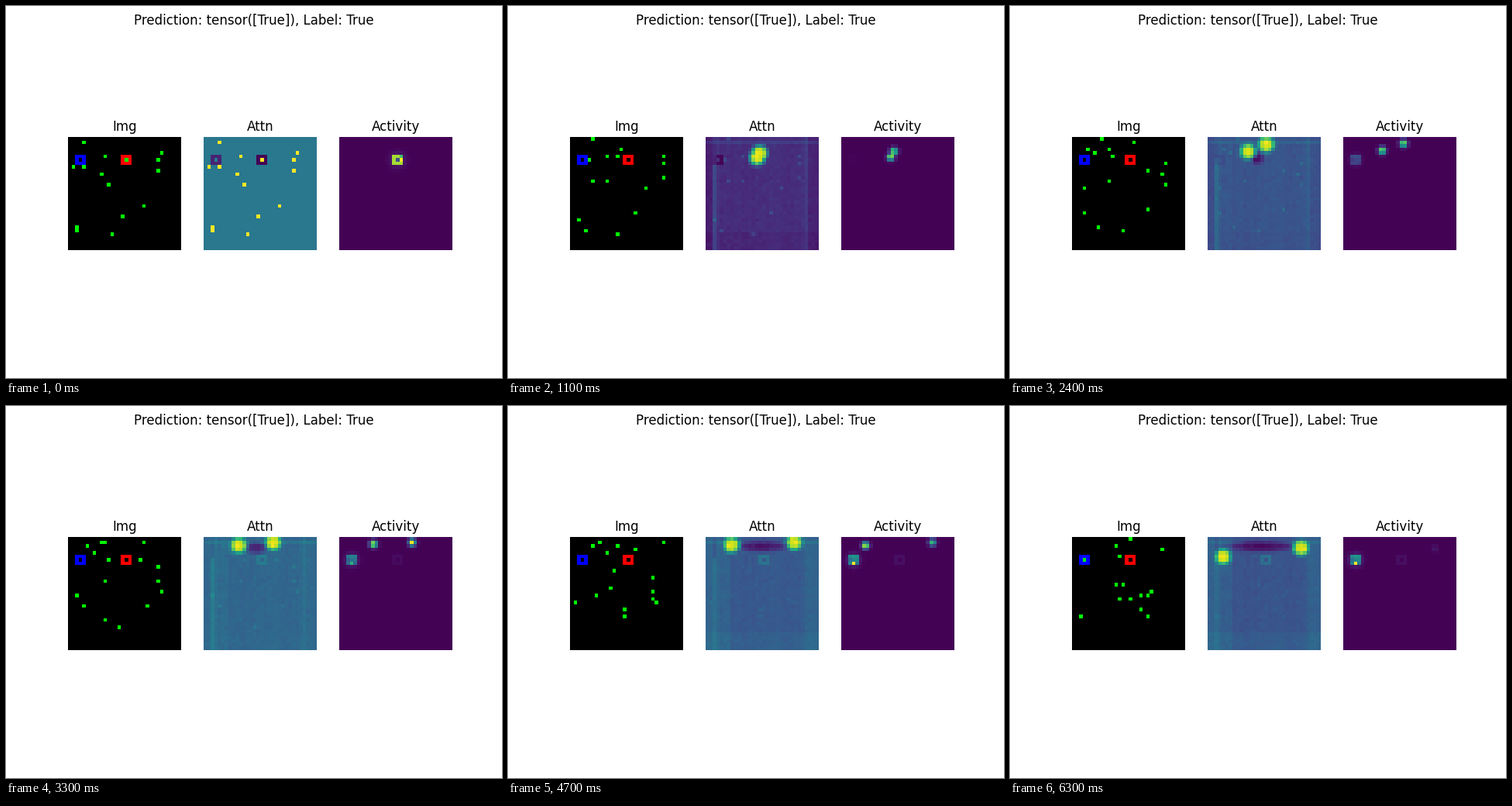
A matplotlib script for the animation above (6.4 s loop, 640x480 px).

```python
import numpy as np
import matplotlib.pyplot as plt
from matplotlib.animation import FuncAnimation

N, FRAMES, INTERVAL = 32, 64, 100
RED, BLUE = (16, 6), (3, 6)  # (column, row) of the ring centres

# Key points of the two tracked dots
TIMES = [0, 11, 24, 33, 47, 54, 63]
TARGET = [(16, 6), (13, 5), (10, 3), (9, 1), (6, 2), (5, 4), (3, 6)]
DECOY = [(16, 6), (14, 3), (17, 1), (21, 1), (26, 1), (27, 2), (25, 3)]

# Start and end cell of every distractor; between them it bows outwards
PATHS = np.array([
    (4, 1, 17, 6), (10, 5, 14, 13), (26, 4, 19, 16), (25, 6, 19, 20),
    (25, 9, 21, 22), (1, 8, 12, 2), (4, 8, 13, 5), (9, 10, 2, 22),
    (11, 13, 13, 17), (21, 19, 16, 0), (15, 22, 22, 15), (2, 25, 12, 13),
    (2, 26, 21, 16), (12, 27, 16, 17),
])
STARTS, ENDS = PATHS[:, :2], PATHS[:, 2:]
OUTWARD = (STARTS + ENDS) / 2 - (14, 18)
OUTWARD /= np.hypot(*OUTWARD.T)[:, None]
BOW = 3.2

yy, xx = np.mgrid[:N, :N]
rng = np.random.default_rng(4)
grain = rng.normal(0, 0.008, (N, N)) + rng.normal(0, 0.005, N)


def ease(t, start, end):
    s = np.clip((t - start) / (end - start), 0, 1)
    return s * s * (3 - 2 * s)


def tracked(t):
    return np.array([[np.interp(t, TIMES, axis) for axis in zip(*path)]
                     for path in (TARGET, DECOY)])


def dot_cells(t):
    s = t / (FRAMES - 1)
    others = STARTS + (ENDS - STARTS) * s + BOW * 4 * s * (1 - s) * OUTWARD
    spots = np.rint(np.vstack([tracked(t), others])).astype(int)
    return tuple(np.clip(spots, 0, N - 1).T[::-1])  # rows, columns


def dist2(x, y):
    return (xx - x) ** 2 + (yy - y) ** 2


def ring(center):
    x, y = center
    return np.maximum(abs(xx - x), abs(yy - y)) == 1


def stimulus(t):
    img = np.zeros((N, N, 3))
    img[dot_cells(t)] = (0, 1, 0)
    img[ring(RED)] = (1, 0, 0)
    img[ring(BLUE)] = (0, 0, 1)
    return img


def attention(t):
    if t == 0:
        a = np.full((N, N), 0.4)
        a[dot_cells(t)] = 1
        a[ring(RED)] = 0
        a[ring(BLUE)] = 0.1
        return a

    late = ease(t, 11, 54)
    a = 0.13 + 0.2 * ease(t, 10, 33) - 0.07 * ease(t, 33, 54) + grain

    # border bands
    a[:, :2] += 0.1 * late - 0.04
    a[6:, 2] += 0.09
    a[:, 3:7] += 0.04 * late
    a[:, 28] += 0.04
    a[:, 29:] += 0.08 * late - 0.03
    a[27:] += 0.05 * late - 0.02
    a[1] += 0.05

    a[dot_cells(t)] += 0.09 - 0.06 * late
    a[ring(BLUE)] -= 0.12 * (1 - ease(t, 11, 33))

    # inhibited zone between the two blobs
    pair = tracked(t - 4)
    width = max(1.8, (pair[1, 0] - pair[0, 0]) / 2 - 2)
    y = 5.5 - 3.5 * ease(t, 24, 36)
    reach = ((xx - pair[:, 0].mean()) / width) ** 2 + ((yy - y) / 1.7) ** 2
    a -= 0.22 * ease(t, 11, 24) * np.exp(-reach ** 2)
    a[ring(RED)] += 0.1 * ease(t, 24, 36)

    glow = np.max([np.exp(-(dist2(x, y) / 5) ** 2) for x, y in pair], axis=0)
    return a + (0.96 + 2 * grain - a) * glow


def activity(t):
    a = np.full((N, N), 0.004)
    onset = min(1, t / 4)
    strengths = (1 - ease(t, 47, 62), 1 - 0.95 * ease(t, 36, 66))
    for (x, y), s in zip(tracked(t - 2), strengths):
        a = np.maximum(a, onset * s * np.exp(-dist2(x, y) / 1.0))

    # start ring, fading as the dots leave it
    start = 0.1 * np.exp(-dist2(*RED) / 6)
    start[ring(RED)] = 0.87
    start[6, 16:18] = 0.25, 1
    start[5, 17] = 0.7
    a = np.maximum(a, (1 - onset) * start)
    a[ring(RED)] += 0.035 * ease(t, 20, 40)

    # goal ring
    level = 0.5 * ease(t, 8, 42)
    goal = 0.4 * level * np.exp(-dist2(*BLUE) / 3.5)
    goal[ring(BLUE)] = level * (0.9 + 15 * grain[ring(BLUE)])
    goal[6, 3] = level * 0.9
    goal[7, 3] = max(level * 0.9, ease(t, 20, 42))
    return np.maximum(a, goal)


fig, axes = plt.subplots(1, 3, figsize=(6.4, 4.8), dpi=100)
fig.suptitle("Prediction: tensor([True]), Label: True")
panels = []
for ax, name, view in zip(axes, ("Img", "Attn", "Activity"),
                          (stimulus, attention, activity)):
    ax.set_title(name)
    ax.axis("off")
    panels.append((ax.imshow(view(0), cmap="viridis", vmin=0, vmax=1), view))


def update(t):
    for image, view in panels:
        image.set_data(view(t))
    return [image for image, _ in panels]


anim = FuncAnimation(fig, update, frames=FRAMES, interval=INTERVAL,
                     repeat=True, repeat_delay=0)
plt.show()
```
